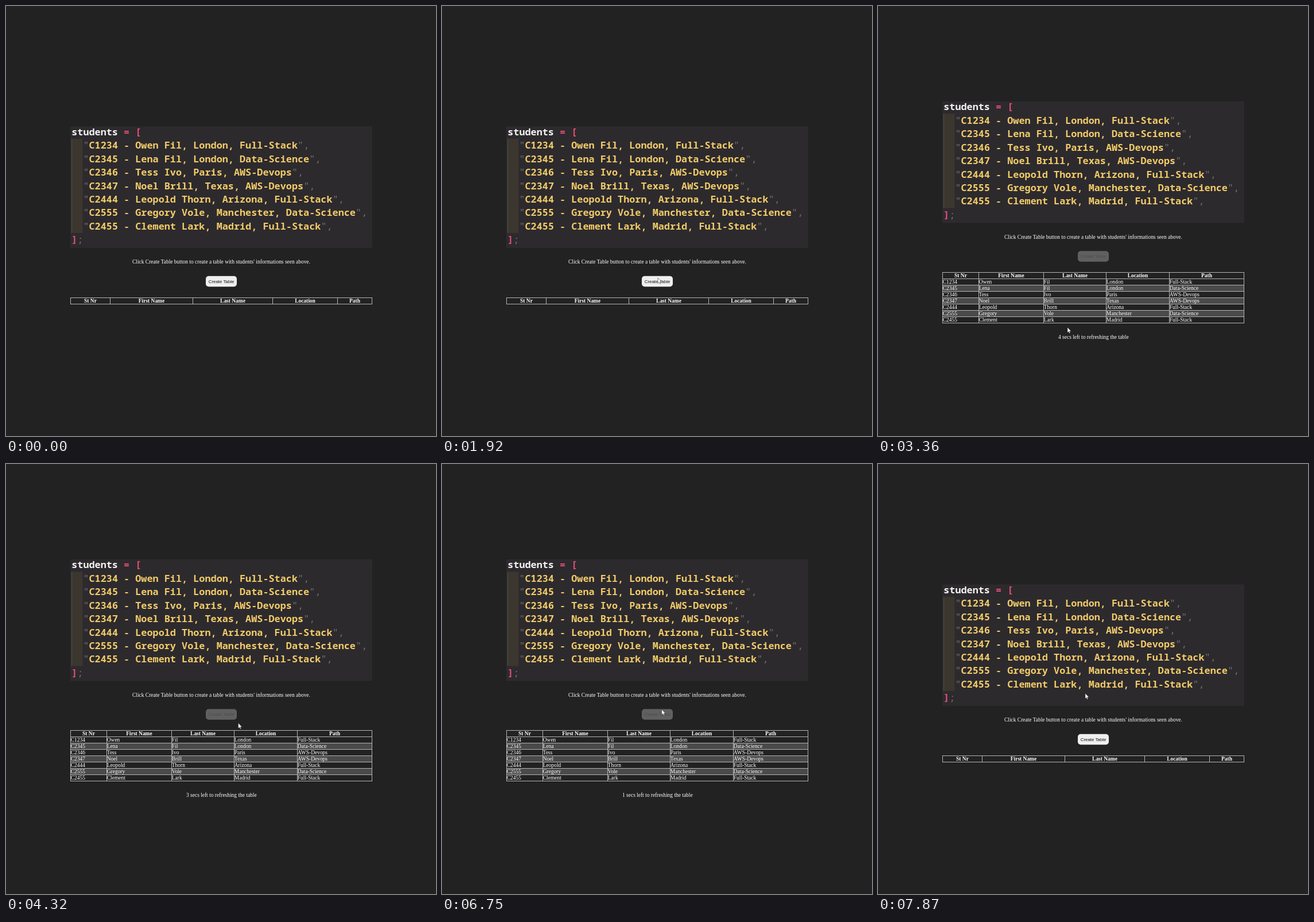
Recreate the animation shown at these times as an HTML page. Size 749x748 px, loop 8 s.

```html
<!DOCTYPE html>
<html lang="en">
<head>
<meta charset="utf-8">
<title>Student table</title>
<style>
  html, body { margin: 0; width: 100%; height: 100%; overflow: hidden; background: #222; }
  svg { display: block; width: 749px; height: 748px; }
  text { white-space: pre; fill: #fff; font: 9.45px "Liberation Serif", "Times New Roman", serif; }
  .code text { fill: #f2cc68; font: 600 16.83px "Noto Sans Mono", "DejaVu Sans Mono", monospace; }
  .code .plain { fill: #f4f4f2; }
  .code .pink { fill: #ea5076; }
  .code .dim { fill: #727072; font-weight: 400; }
  .head { font-weight: bold; }
  .mid { text-anchor: middle; }
  .label { font: 7.9px "Liberation Sans", Arial, sans-serif; fill: #101010; }
  .grid { fill: none; stroke: #b4b4b4; shape-rendering: crispEdges; }
</style>
</head>
<body>
<svg viewBox="0 0 749 748">
  <g id="page">
    <g class="code" id="code">
      <rect x="112" y="166" width="526" height="211.3" fill="#2d2a2e"/>
      <rect x="114" y="187.6" width="19.5" height="163.8" fill="#3b372f"/>
      <rect x="114" y="187.6" width=".7" height="163.8" fill="#5b595c"/>
    </g>
    <text class="mid" x="375" y="404.9">Click Create Table button to create a table with students' informations seen above.</text>
    <g id="button">
      <rect x="348" y="426.3" width="54" height="18.5" rx="5" fill="#efefef"/>
      <text class="mid label" id="label" x="375" y="438.2">Create Table</text>
    </g>
    <g id="empty"></g>
    <g id="full"></g>
    <text id="count" x="314" y="578.5"></text>
  </g>
  <path id="cursor" d="M0 0V9.2L2.1 7.4L3.5 10.4L4.9 9.8L3.6 6.8H6.4Z" fill="#fff" stroke="#222" stroke-width=".5"/>
</svg>
<script>
const $ = id => document.getElementById(id);
const students = [
  "C1234 - Owen Fil, London, Full-Stack",
  "C2345 - Lena Fil, London, Data-Science",
  "C2346 - Tess Ivo, Paris, AWS-Devops",
  "C2347 - Noel Brill, Texas, AWS-Devops",
  "C2444 - Leopold Thorn, Arizona, Full-Stack",
  "C2555 - Gregory Vole, Manchester, Data-Science",
  "C2455 - Clement Lark, Madrid, Full-Stack"
];
const heads = ["St Nr", "First Name", "Last Name", "Location", "Path"];
const TOP = 463.5, ROW = 11;

function add(parent, tag, attrs, text = "") {
  const el = document.createElementNS("http://www.w3.org/2000/svg", tag);
  for (const k in attrs) el.setAttribute(k, attrs[k]);
  el.textContent = text;
  parent.append(el);
}

// Code listing, placed by column and line
function code(col, line, text, cls = "") {
  add($("code"), "text", { x: 114.2 + col * 10.1, y: 181.4 + line * 23.43, class: cls }, text);
}
code(0, 0, "students", "plain");
code(9, 0, "=", "pink");
code(11, 0, "[", "pink");
students.forEach((s, i) => {
  code(2, i + 1, '"', "dim");
  code(3, i + 1, s);
  code(3 + s.length, i + 1, '",', "dim");
});
code(0, 8, "]", "pink");
code(1, 8, ";", "dim");

function table(parent, xs, rows) {
  const bottom = TOP + ROW * (rows.length + 1);
  let lines = "";
  rows.forEach((cells, r) => {
    const y = TOP + ROW * (r + 1);
    if (r % 2) add(parent, "rect", { x: 112, y, width: 526, height: ROW, fill: "#4a4a4a" });
    cells.forEach((c, i) => add(parent, "text", { x: xs[i] + .3, y: y + 8.7 }, c));
  });
  heads.forEach((h, i) =>
    add(parent, "text", { x: (xs[i] + xs[i + 1]) / 2, y: TOP + 8.7, class: "head mid" }, h));
  for (const x of xs) lines += `M${x} ${TOP}V${bottom}`;
  for (let y = TOP; y <= bottom; y += ROW) lines += `M112 ${y}H638`;
  add(parent, "path", { d: lines, class: "grid" });
}
table($("empty"), [112.5, 181.5, 325.5, 464.5, 577.5, 637.5], []);
table($("full"), [112.5, 175.5, 288.5, 397.5, 507.5, 637.5], students.map(s => {
  const [id, name, place, path] = s.split(/ - |, /);
  return [id, ...name.split(" "), place, path];
}));

// Pointer path: time, x, y
const path = [
  [160, 296, 180], [640, 345, 205], [1120, 383, 265], [1760, 376, 472], [1920, 376, 473],
  [2080, 375.5, 475.5], [2400, 440, 490], [2720, 474, 530], [3040, 410, 600], [3360, 330, 559],
  [3680, 311, 545], [4480, 428, 427], [4800, 440, 424], [5280, 448, 421.5], [6590, 448, 421.5],
  [6910, 317.5, 432.5], [7230, 345, 470], [7550, 426, 426], [7870, 361, 399]
];
function pointer(t) {
  const n = path.findIndex(p => p[0] > t);
  if (n < 0) return path[path.length - 1].slice(1);
  const a = path[n - 1], b = path[n], k = (t - a[0]) / (b[0] - a[0]);
  return [a[1] + (b[1] - a[1]) * k, a[2] + (b[2] - a[2]) * k];
}

function sample(t) {
  if (t < 5930) return Math.floor(t / 160) * 160;
  if (t < 6590) return 5930;
  return 30 + Math.floor((t - 30) / 160) * 160;
}

const CLICK = 1925, RESET = 6910;
const ramp = (t, start) => Math.min(1, Math.max(0, (t - start) / 500));

function draw(now) {
  const t = sample(now % 8000), filled = t >= CLICK && t < RESET;
  $("page").setAttribute("transform", `translate(0 ${filled ? 0 : 43.5})`);
  $("full").style.display = filled ? "" : "none";
  $("empty").style.display = filled ? "none" : "";
  $("count").textContent = filled
    ? `${5 - Math.floor((t - CLICK) / 1000)} secs left to refreshing the table` : "";
  $("button").style.opacity = 1 - .7 * (ramp(t, CLICK) - ramp(t, RESET));
  $("label").style.fillOpacity = t >= CLICK && t <= RESET ? .3 : 1;
  $("cursor").style.display = t < 160 ? "none" : "";
  if (t >= 160) $("cursor").setAttribute("transform", `translate(${pointer(t)})`);
  requestAnimationFrame(loop);
}
const start = performance.now();
function loop() { draw(performance.now() - start); }
loop();
</script>
</body>
</html>
```
